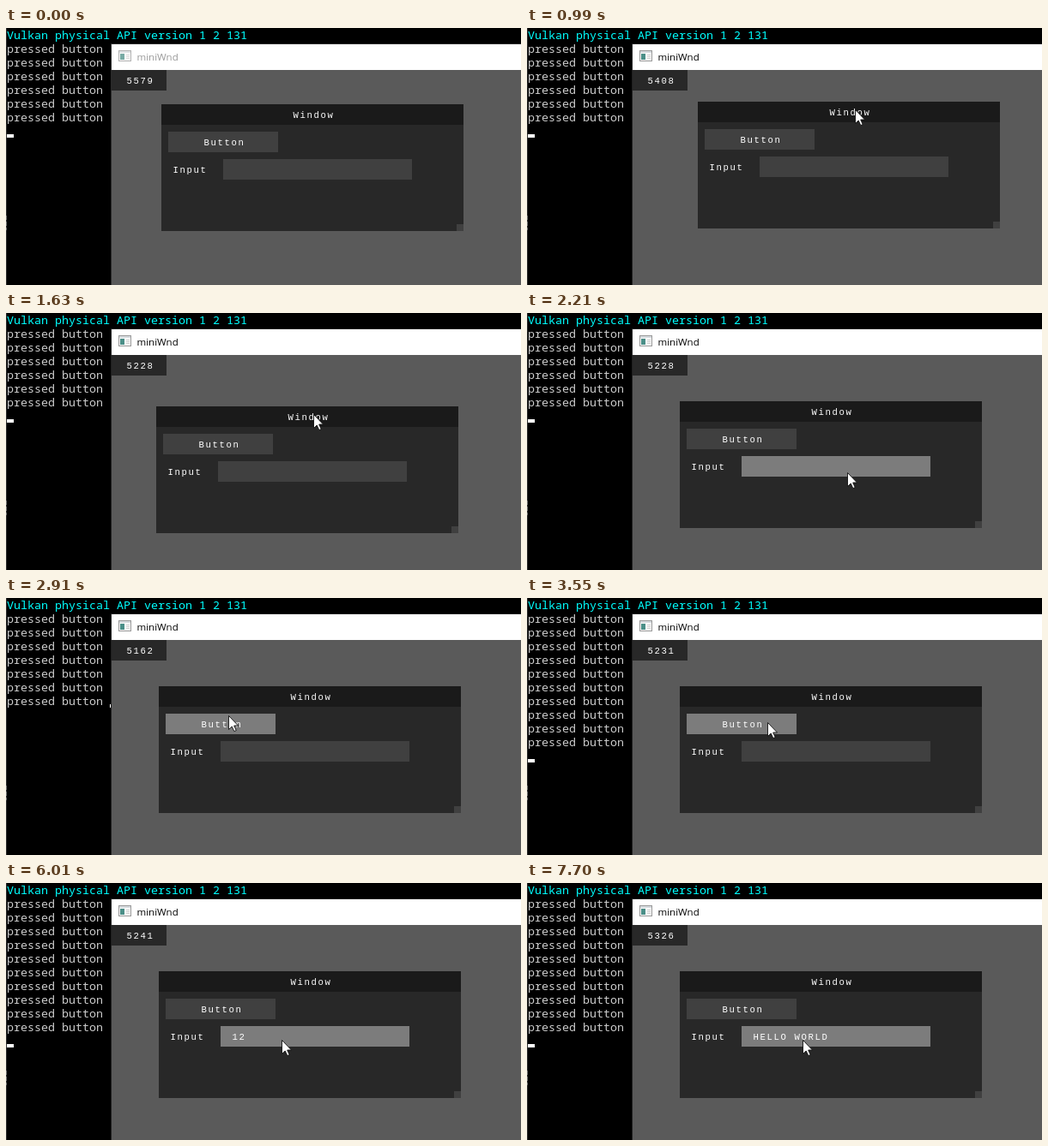
These frames come from a looping animation (600x300 px, 8 s). An HTML page:

```html
<!DOCTYPE html>
<html lang="en">
<head>
<meta charset="utf-8">
<title>miniWnd</title>
<style>
  html, body { margin: 0; width: 100%; height: 100%; overflow: hidden; background: #000; }
  svg { display: block; width: 600px; height: 300px; }
  text { white-space: pre; }
  .console { font: 13.33px "Noto Sans Mono", monospace; fill: #ccc; }
  .ui { font: 10.6px "Liberation Mono", monospace; letter-spacing: 1.64px; fill: #fff; }
  .caption { font: 11.5px "Open Sans", sans-serif; }
</style>
</head>
<body>
<svg viewBox="0 0 600 300" shape-rendering="crispEdges">
  <rect width="600" height="300" fill="#000"/>
  <rect width="1" height="300" fill="#303030"/>
  <path d="M.5 219v17" stroke="#777" stroke-dasharray="5 2"/>
  <g class="console" id="console">
    <text x="1" y="13" fill="#0ff">Vulkan physical API version 1 2 131</text>
  </g>
  <rect id="caret" width="8" height="4" fill="#fff"/>

  <rect id="frame" x="122" y="18" width="478" height="282"/>
  <rect x="123" y="19" width="477" height="30" fill="#fff"/>
  <g id="icon">
    <rect x="131.5" y="26.5" width="14" height="12" fill="#f8f8f8" stroke="#999"/>
    <rect x="132" y="27" width="13" height="2" fill="#d5dade"/>
    <rect x="133" y="30" width="5" height="7" fill="#4b8f88"/>
    <path d="M140 31.5h4M140 33.5h4M140 35.5h4" stroke="#d0d0d0"/>
  </g>
  <text class="caption" id="caption" x="152.5" y="38">miniWnd</text>
  <rect x="123" y="49" width="477" height="251" fill="#5a5a5a"/>
  <rect x="123" y="49" width="64" height="24" fill="#282828"/>
  <text class="ui" id="counter" x="140.5" y="65"></text>

  <g id="panel">
    <rect width="352" height="148" fill="#282828"/>
    <rect width="352" height="24" fill="#1a1a1a"/>
    <rect id="button" x="8" y="32" width="128" height="24"/>
    <rect id="field" x="72" y="64" width="220" height="24"/>
    <rect x="344" y="140" width="8" height="8" fill="#404040"/>
    <g class="ui">
      <text x="153.5" y="16">Window</text>
      <text x="49.5" y="48">Button</text>
      <text x="13.5" y="80">Input</text>
      <text id="value" x="85.5" y="80"></text>
    </g>
  </g>
  <path id="pointer" d="M.5 .5V16.5L4.2 13L6.8 18.6L9.2 17.6L6.7 12H11.5Z" fill="#fff" stroke="#111" stroke-width=".9" shape-rendering="auto"/>
</svg>
<script>
const LOOP = 8000;
const ids = ["console", "caret", "frame", "icon", "caption", "counter", "panel", "button", "field", "value", "pointer"];
const ui = Object.fromEntries(ids.map(id => [id, document.getElementById(id)]));

const ACTIVATE = 840, GRAB = 940, DROP = 1740;
const HOME = [181, 89], GRIP = [183, 9];
const PRESS = { start: 2900, pace: 190, count: 4 };
const FIRST_LINES = 6, CARET_LAG = 40;
const READINGS = "5579 5408 5228 5162 5231 5478 5241 5382 5326".split(" ");

// pointer path: time, x, y
const path = [
  [100, 600, 190], [780, 364, 98],                                    // enter
  [940, 364, 98], [990, 382, 95], [1060, 398, 102], [1260, 353, 110], // drag
  [1450, 346, 122], [1630, 358, 118], [1740, 361, 112],
  [1930, 380, 88], [2360, 362, 231], [2560, 322, 204],                // wander
  [2860, 259, 137], [3480, 259, 137],                                 // button
  [3740, 374, 181], [4660, 374, 181],                                 // field
  [5050, 531, 252], [5440, 321, 183]
];

const clamp = (v, lo, hi) => Math.min(hi, Math.max(lo, v));

function slope(i, k) {
  const a = path[i - 1], p = path[i], b = path[i + 1];
  const still = q => q[1] === p[1] && q[2] === p[2];
  return !a || !b || still(a) || still(b) ? 0 : (b[k] - a[k]) / (b[0] - a[0]);
}

// cubic Hermite through the path points, snapped to whole pixels
function pointerAt(time) {
  const t = clamp(time, path[0][0], path.at(-1)[0]);
  const i = Math.min(path.findLastIndex(p => p[0] <= t), path.length - 2);
  const a = path[i], b = path[i + 1];
  const d = b[0] - a[0], u = (t - a[0]) / d, v = 1 - u;
  return [1, 2].map(k => Math.round(
    a[k] * v * v * (1 + 2 * u) + b[k] * u * u * (3 - 2 * u) +
    d * u * v * (slope(i, k) * v - slope(i + 1, k) * u)));
}

// how many evenly paced events have happened by time t
const events = (t, start, pace, max) => clamp(Math.floor((t - start) / pace) + 1, 0, max);

function typed(t) {
  if (t < 6680) {
    const kept = events(t, 4140, 120, 3) - events(t, 6010, 120, 3);
    return "123".slice(0, kept);
  }
  return "HELLO WORLD".slice(0, events(t, 6680, 100, 11));
}

const place = (node, [x, y]) => node.setAttribute("transform", `translate(${x} ${y})`);
const fill = (node, color) => node.setAttribute("fill", color);
const write = (node, s) => { if (node.textContent !== s) node.textContent = s; };

const lines = Array.from({ length: FIRST_LINES + PRESS.count }, (_, i) => {
  const line = ui.console.firstElementChild.cloneNode();
  line.removeAttribute("fill");
  line.setAttribute("y", 29 + 16 * i);
  line.textContent = "pressed button";
  return ui.console.appendChild(line);
});

function drawConsole(t) {
  const { start, pace, count } = PRESS;
  const done = events(t, start, pace, count);
  const n = FIRST_LINES + done;
  lines.forEach((line, i) => line.setAttribute("visibility", i < n ? "visible" : "hidden"));
  const inline = done > 0 && t - start - pace * (done - 1) < CARET_LAG;
  place(ui.caret, [inline ? 121 : 1, 28 + 16 * (inline ? n - 1 : n)]);
}

function drawPanel(t, [px, py]) {
  const held = pointerAt(Math.min(t, DROP));
  const origin = t < GRAB ? HOME : held.map((c, k) => c - GRIP[k]);
  place(ui.panel, origin);
  const x = px - origin[0], y = py - origin[1];
  const shade = (left, top, w) =>
    x >= left && x < left + w && y >= top && y < top + 24 ? "#7c7c7c" : "#404040";
  fill(ui.button, shade(8, 32, 128));
  fill(ui.field, shade(72, 64, 220));
  write(ui.value, typed(t));
}

function draw(t) {
  const active = t >= ACTIVATE;
  const tip = pointerAt(t);
  drawConsole(t);
  drawPanel(t, tip);
  fill(ui.frame, active ? "#1e1e1e" : "#2a2a2a");
  fill(ui.caption, active ? "#000" : "#999");
  ui.icon.setAttribute("opacity", active ? 1 : .75);
  write(ui.counter, READINGS[events(t, 430, 1000, READINGS.length - 1)]);
  place(ui.pointer, tip);
}

const start = performance.now();
function tick() {
  draw((performance.now() - start) % LOOP);
  requestAnimationFrame(tick);
}
tick();
</script>
</body>
</html>
```
